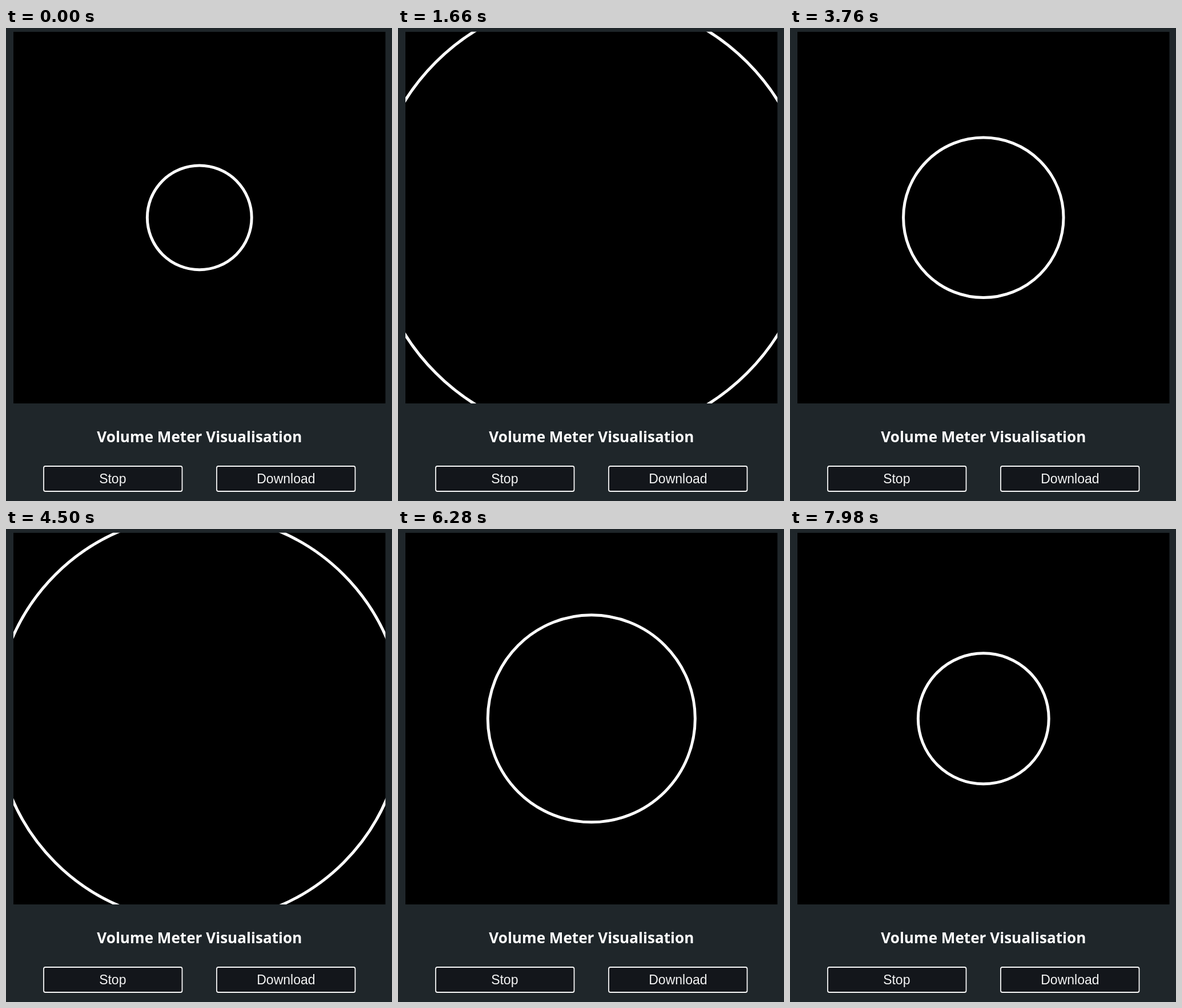
An HTML page for the animation above (8000 ms loop, 676x829 px).

```html
<!DOCTYPE html>
<html lang="en">
<head>
<meta charset="utf-8">
<title>Volume Meter Visualisation</title>
<style>
  html, body { margin: 0; width: 100%; height: 100%; overflow: hidden; background: #1f262a; }
  svg { display: block; }
  text { fill: #fff; text-anchor: middle; }
  .title { font: 700 26.1px "Open Sans", "Noto Sans", sans-serif; }
  .label { font: 23px "Liberation Sans", Arial, sans-serif; fill: #f4f4f4; }
  .button { fill: #13161b; stroke: #f8f8f8; stroke-width: 1.8; }
  #ring { fill: none; stroke: #fff; stroke-width: 5; }
</style>
</head>
<body>
<svg width="676" height="829" viewBox="0 0 676 829">
  <svg x="13" y="6.5" width="651.5" height="651.5">
    <rect width="652" height="652"/>
    <circle id="ring" cx="325.8" cy="325.8" r="91.4"/>
  </svg>
  <text class="title" x="338.8" y="726.4">Volume Meter Visualisation</text>
  <rect class="button" x="66" y="768" width="242.5" height="44" rx="3"/>
  <text class="label" x="186.8" y="798.3">Stop</text>
  <rect class="button" x="369" y="768" width="242.5" height="44" rx="3"/>
  <text class="label" x="490.4" y="798.3">Download</text>
</svg>
<script>
  const LOOP = 8000, LEAD_IN = 20, BEAT = 560, RELEASE = 700, REST_RADIUS = 91.4;

  // Loudness of each beat, in px added to the resting radius.
  const BEATS = [0, 190, 225, 294, 42, 187, 193, 120, 290, 0, 290, 126, 290, 90, 34];

  const ring = document.getElementById("ring");

  // The meter refreshes in a 20, 20, 100 ms rhythm.
  function refresh(t) {
    const phase = t % 140;
    return t - phase + Math.min(Math.floor(phase / 20) * 20, 40);
  }

  // Each beat jumps up at once, then eases back to rest.
  function level(peak, age) {
    return age < 0 || age > RELEASE ? 0 : peak * (1 - age / RELEASE) ** 1.5;
  }

  function volume(t) {
    return Math.max(...BEATS.map((peak, i) => level(peak, t - i * BEAT)));
  }

  const start = performance.now();

  function draw() {
    const t = (performance.now() - start) % LOOP + LEAD_IN;
    ring.setAttribute("r", REST_RADIUS + volume(refresh(t)));
    requestAnimationFrame(draw);
  }
  draw();
</script>
</body>
</html>
```
